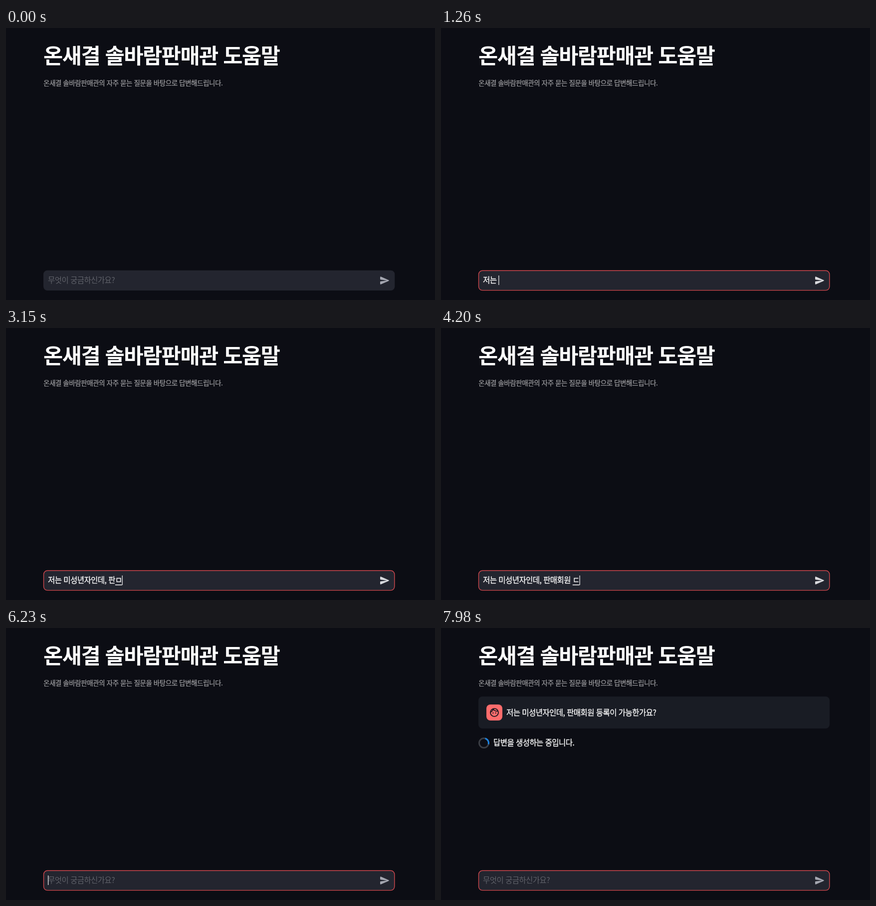
Write an HTML page that moves like this. It is 860 by 544 pixels and loops after 8000 ms.

```html
<!DOCTYPE html>
<html lang="ko">
<head>
<meta charset="utf-8">
<title>도움말</title>
<style>
  html, body { margin: 0; width: 100%; height: 100%; overflow: hidden; background: #0c0d14; }
  svg { display: block; width: 860px; height: 544px; }
  text {
    font: 500 15.5px "Noto Sans CJK KR", "Noto Sans KR", "Noto Sans CJK", sans-serif;
    letter-spacing: -.54px;
    white-space: pre;
    fill: #fafafa;
    stroke: #fafafa;
    stroke-width: .3px;
  }
  .title { font-size: 42.6px; font-weight: 700; letter-spacing: -1.48px; fill: #fff; stroke: none; }
  .caption { font-size: 13.56px; letter-spacing: -.46px; fill: #9c9c9f; stroke: #9c9c9f; stroke-width: .25px; }
  .hint { font-weight: 400; fill: #5f6169; stroke: none; }
</style>
</head>
<body>
<svg viewBox="0 0 860 544">
  <rect width="860" height="544" fill="#0c0d14"/>
  <text class="title" x="75" y="71.3">온새결 솔바람판매관 도움말</text>
  <text class="caption" x="75" y="115">온새결 솔바람판매관의 자주 묻는 질문을 바탕으로 답변해드립니다.</text>

  <g id="message">
    <rect x="75" y="137" width="704" height="64" rx="8" fill="#191c24"/>
    <rect x="91" y="153" width="32" height="32" rx="8" fill="#ff6c6c"/>
    <path transform="translate(96.45 158.45) scale(.88)" fill="#14161d" fill-rule="evenodd" d="M10.25 13c0 .69-.56 1.25-1.25 1.25S7.75 13.69 7.75 13s.56-1.25 1.25-1.25 1.25.56 1.25 1.25zM15 11.75c-.69 0-1.25.56-1.25 1.25s.56 1.25 1.25 1.25 1.25-.56 1.25-1.25-.56-1.25-1.25-1.25zm7 .25c0 5.52-4.48 10-10 10S2 17.52 2 12 6.48 2 12 2s10 4.48 10 10zM10.66 4.12C12.06 6.44 14.6 8 17.5 8c.46 0 .91-.05 1.34-.12C17.44 5.56 14.9 4 12 4c-.46 0-.91.05-1.34.12zM4.42 9.47c1.71-.97 3.03-2.55 3.66-4.44C6.37 6 5.05 7.58 4.42 9.47zM20 12c0-.78-.12-1.53-.33-2.24-.7.15-1.42.24-2.17.24-3.13 0-5.92-1.44-7.76-3.69C8.69 8.87 6.6 10.88 4 11.86c.01.04 0 .09 0 .14 0 4.41 3.59 8 8 8s8-3.59 8-8z"/>
    <text x="131" y="174.7">저는 미성년자인데, 판매회원 등록이 가능한가요?</text>
  </g>

  <g id="waiting">
    <g fill="none" stroke-width="3">
      <circle cx="86" cy="230" r="9.5" stroke="#3b3e45"/>
      <path id="arc" d="M79.28 223.28A9.5 9.5 0 0 1 92.72 223.28" stroke="#1c83e1"/>
    </g>
    <text x="105" y="235">답변을 생성하는 중입니다.</text>
  </g>

  <rect x="75" y="484.7" width="704.3" height="40.4" rx="8" fill="#23252f"/>
  <rect id="ring" x="75.5" y="485.2" width="703.3" height="39.4" rx="7.5" fill="none" stroke="#d0474d" stroke-width="1.4"/>
  <text id="hint" class="hint" x="84" y="510">무엇이 궁금하신가요?</text>
  <text id="typed" x="84" y="510"></text>
  <rect id="underline" y="513" height="1.5" fill="#fafafa"/>
  <rect id="caret" y="495" width="1.2" height="19" fill="#fafafa"/>
  <path id="send" transform="translate(748.2 494) scale(.917)" d="M3.4 20.4l17.45-7.48c.81-.35.81-1.49 0-1.84L3.4 3.6c-.66-.29-1.39.2-1.39.91L2 9.12c0 .5.37.93.87.99L17 12 2.87 13.88c-.5.07-.87.5-.87 1l.01 4.61c0 .71.73 1.2 1.39.91z"/>
</svg>
<script>
const LOOP = 8000, TICK = 70;
const FOCUS = 210, SUBMIT = 6160, REPLY = 6300, WAIT = 6580;
const INPUT_X = 84;

// Keystrokes as "tick:text" after a fixed beginning; "_" is a space.
const bursts = [
  ['', '11:ㅈ 12:저 13:전 15:저느 16:저는 18:저는_'],
  ['저는 ', '19:ㅁ 20:미 21:밋 22:미서 24:미성 26:미성ㄴ 27:미성녀 28:미성년'],
  ['저는 미성', '29:녅 30:년자 31:년장 33:년자인 35:년자인데 36:년자인데, 38:년자인데,_'],
  ['저는 미성년자인데, ', '40:ㅍ 42:파 43:판 45:판ㅁ 46:판매 50:판맿 52:판매호 53:판매회 54:판매횡 55:판매회우 56:판매회워 57:판매회원 59:판매회원_'],
  ['저는 미성년자인데, 판매회원 ', '60:ㄷ 61:드 62:등 64:등ㄹ 65:등로 66:등록 68:등록이 69:등록이_'],
  ['저는 미성년자인데, 판매회원 등록이 ', '70:ㄱ 71:가 73:가느 74:가능 76:가능하 77:가능한 79:가능한ㄱ 81:가능한가 82:가능한가요 84:가능한가요?']
];
const strokes = bursts.flatMap(([base, keys]) => keys.split(' ').map(key => {
  const [tick, tail] = key.split(':');
  return { at: tick * TICK, text: base + tail.replace('_', ' ') };
}));

const $ = id => document.getElementById(id);
const show = (id, on) => $(id).setAttribute('visibility', on ? 'visible' : 'hidden');
const set = (id, name, value) => $(id).setAttribute(name, value);

function typedAt(t) {
  if (t >= SUBMIT) return '';
  const past = strokes.filter(s => s.at <= t);
  return past.length ? past[past.length - 1].text : '';
}

function draw(t) {
  const text = typedAt(t);
  const typed = $('typed');
  if (typed.textContent !== text) typed.textContent = text;
  const width = text ? typed.getComputedTextLength() : 0;
  const end = INPUT_X + width;

  set('ring', 'opacity', Math.min(1, Math.max(0, (t - FOCUS + TICK) / (4 * TICK))));
  show('hint', !text);
  set('send', 'fill', text ? '#d9dade' : '#a5a7b1');

  const blinkOn = t < SUBMIT || (t - SUBMIT) % 1000 < 500;
  show('caret', t > FOCUS && blinkOn);
  set('caret', 'x', end);

  // The syllable being composed is underlined.
  const composing = /[^\s,?]$/.test(text);
  show('underline', composing);
  if (composing) {
    const last = typed.getSubStringLength(text.length - 1, 1);
    set('underline', 'x', end - last);
    set('underline', 'width', last);
  }

  show('message', t >= REPLY);
  show('waiting', t >= WAIT);
  set('arc', 'transform', `rotate(${(t - 6790) * 0.36 - 8} 86 230)`);
}

const start = performance.now();
function frame() {
  const t = (performance.now() - start) % LOOP;
  draw(Math.floor(t / TICK) * TICK);
  requestAnimationFrame(frame);
}
frame();
</script>
</body>
</html>
```
